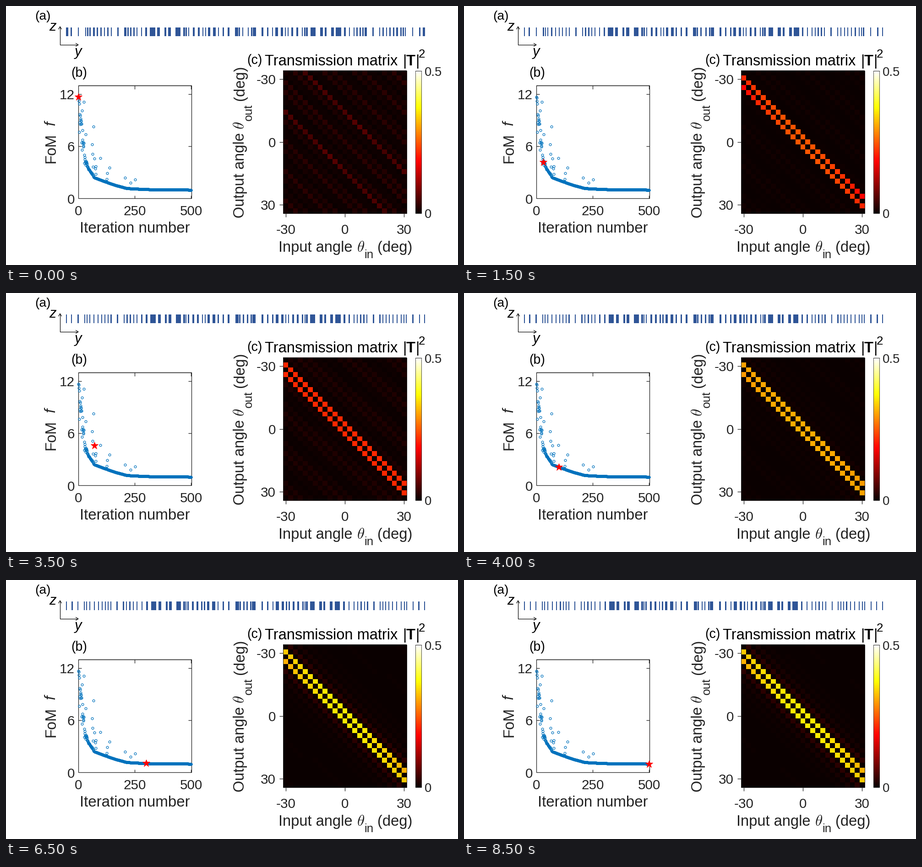
Write a matplotlib script that moves like this. It is 987 px wide and 567 px high and loops after 9 s.

```python
import numpy as np
import matplotlib.pyplot as plt
from matplotlib.animation import FuncAnimation
from matplotlib.collections import PolyCollection

W, H, DPI = 987, 567, 64
PT = 72 / DPI  # points per pixel
INK, BLUE, BAR = "#222222", "#0072BD", "#2F5597"
plt.rcParams["font.family"] = "Liberation Sans"

fig = plt.figure(figsize=(W / DPI, H / DPI), dpi=DPI, facecolor="white")
ax = fig.add_axes([0, 0, 1, 1])


def label(x, y, s, size=32.6, color=INK, **kw):
    ax.text(x, y, s, fontsize=size * PT, color=color, va="baseline",
            rotation_mode="anchor", **kw)


def line(xs, ys, width=1.3, color=INK):
    ax.plot(xs, ys, color=color, lw=width * PT, zorder=2,
            solid_capstyle="butt", solid_joinstyle="miter")


def box(x0, y0, x1, y1, width=1.3):
    line([x0, x1, x1, x0, x0, x1], [y0, y0, y1, y1, y0, y0], width)


def tick(x, y, s, ha="center", size=29.6):
    label(x, y + 0.355 * size, s, size, ha=ha)


# ---- (a) structure: an uneven comb, mirrored about the middle
MID, PITCH = 523, 9.87
comb = np.arange(40)
SHIFT = [(0, 0), (1, 0), (3, 12), (5, 1.7), (8, -3.5), (11, -10.6), (13, -1.3),
         (17, -13.8), (20, -14.4), (22, -2.1), (23, -4), (25, 9.2), (27, 0.5),
         (30, 1.9), (32, -5.8), (36, -2.3), (37, 3.8), (39, 0)]
start = 131 + PITCH * comb + np.interp(comb, *zip(*SHIFT))
drift = 3 * np.cos(2 * np.pi * (np.sqrt(comb + 0.3) - 1) / 1.8)


def bumps(*peaks):
    return sum(a * np.exp(-((comb - c) / 0.8) ** 2) for c, a in peaks)


lasting = 2.3 + bumps((20.2, 10), (22.6, 3), (24, 8), (28.5, 2.5), (32.6, 5.5),
                      (36.9, 5))
fading = bumps((0, 2.7), (6, 1.5), (13, 3))


def bar_shapes(it):
    move = np.interp(it, [1, 31, 71, 150, 350], [0, 0.12, 0.5, 0.65, 1])
    left = start + move * drift
    right = left + lasting + fading * np.exp(-(it - 1) / 10)
    spans = list(zip(left, right))
    spans += [(2 * MID - b, 2 * MID - a) for a, b in spans]
    return [[(a, 47), (b, 47), (b, 66), (a, 66)] for a, b in spans]


bars = PolyCollection(bar_shapes(1), facecolors=BAR, linewidths=0)
ax.add_collection(bars)

label(63, 30, "(a)", 28, "black")
label(94, 54, "z", 31, "black", style="italic")
label(150, 109, "y", 31, "black", style="italic")
line([118, 118, 157], [46, 85, 85], 1.2, "black")
line([114.5, 118, 121.5], [51, 45, 51], 1.2, "black")
line([152, 158, 152], [81.5, 85, 88.5], 1.2, "black")

# ---- (b) figure of merit against iteration
X0, Y0, X1, Y1 = 158, 420.7, 404.5, 173.7
its = np.arange(1, 501)
TREND = [(1, 11.7), (5, 9.8), (11, 9), (21, 6.3), (31, 4.15), (45, 3.4),
         (70, 2.4), (115, 1.95), (165, 1.5), (215, 1.15), (300, 1.03), (500, 0.97)]
SPIKES = [(24, 11.1), (32, 7.35), (60, 6.2), (63, 5.1), (67, 8.25), (71, 4.6),
          (139, 3.55), (207, 2.37), (232, 1.8), (252, 2.15)]
rng = np.random.default_rng(4)
fom = np.interp(its, *zip(*TREND))
# scatter that dies out and vanishes at every tenth step
calm = np.sin(np.pi * (its - 1) / 10) ** 2
fom += rng.normal(0, 1.5, 500) * calm * np.exp(-(its / 28) ** 2)
strays = rng.choice(np.arange(34, 135), 14, replace=False)
fom[strays - 1] += rng.exponential(0.8, 14) * calm[strays - 1]
for k, f in SPIKES:
    fom[k - 1] = f


def spot(it, f):
    return X0 + it * 0.4925, 421 - f * 19


box(X0, Y1, X1, Y0)
for x in (281, 404):
    line([x, x], [Y0, Y0 - 6])
    line([x, x], [Y1, Y1 + 8])
for y in (193, 307):
    line([X0, X0 + 7], [y, y])
    line([X1, X1 - 7], [y, y])
ax.plot(*spot(its, fom), "o", ms=4.9 * PT, mfc="none", mec=BLUE,
        mew=1.2 * PT, zorder=3)
star, = ax.plot([], [], "*", ms=17 * PT, color="red", mew=0.8 * PT, zorder=5)

label(142, 155, "(b)", 28.5, "black")
for x, s in ((158, "0"), (281, "250"), (404, "500")):
    tick(x, 447, s)
for y, s in ((193, "12"), (307, "6"), (422, "0")):
    tick(150, y, s, "right")
label(161, 496, "Iteration number", 33.1)
label(107, 344, "FoM", rotation=90)
label(107, 261, "f", rotation=90, style="italic")

# ---- (c) transmission matrix
row, col = np.mgrid[:29, :25]
order = row - col - 2
gap = np.abs(order)
odd = gap % 2
off = (col - 12) / 12
along = (row + col - 26) / 26


def matrix(it):
    f = fom[it - 1]
    peak = np.interp(f, [1, 1.7, 4.2, 4.6, 9, 11.7],
                     [0.36, 0.325, 0.245, 0.212, 0.105, 0.006])
    dip = np.interp(it, [1, 31, 71, 150], [0, 0.2, 0, 0.1])
    late = np.interp(it, [31, 300], [0, 1])

    if it == 1:  # light spread over many orders, strongest at the sixth
        ripple = 0.6 + 0.4 * np.cos(2 * np.pi * gap / 6 + 2 * along * np.sign(order))
        t = (0.005 + 0.019 * (1 - odd)) * ripple
        return t + 0.028 * (gap == 6) * (1 + 0.2 * np.cos(9 * along))

    wave = 0.6 + 0.4 * np.cos(0.75 * gap + 0.4 + 2 * along * np.sign(order))
    haze = np.interp(f, [1, 1.7, 4.2, 4.6, 9], [0.002, 0.004, 0.007, 0.017, 0.023])
    t = haze * (0.25 + 0.75 * odd) * wave
    t += 0.024 * late * odd * np.exp((3 - gap) / 2)
    main = peak * (1 - dip * off ** 2 * (1 - 0.25 * np.sign(order * off)))
    return np.choose(np.minimum(gap, 2), [0.1 * t, main, t])


view = dict(cmap="hot", vmin=0, vmax=0.5, interpolation="nearest", aspect="auto")
image = ax.imshow(matrix(1), extent=(605, 874.5, 454, 141.7), zorder=1, **view)
ax.imshow(np.linspace(0.5, 0, 256)[:, None], extent=(893.5, 907, 454, 142),
          zorder=1, **view)
box(605, 141.7, 874.5, 454, 1)
box(893.5, 142, 907, 454, 0.8)
for x, s in ((611, "-30"), (740, "0"), (869, "30")):
    line([x, x], [454, 462])
    tick(x, 488, s)
for y, s in ((160, "-30"), (298, "0"), (435, "30")):
    line([597, 605], [y, y])
    tick(589, y, s, "right")
for y, s in ((143, "0.5"), (454, "0")):
    tick(913.5, y, s, "left", 27.5)

label(526, 127, "(c)", 28.5, "black")
label(565, 130, "Transmission matrix", color="black")
label(866, 130, "|", color="black")
label(874, 130, "T", color="black", weight="bold")
label(894, 130, "|", color="black")
label(900.5, 113, "2", 26, "black")

label(595, 538, "Input angle")
label(766, 538, r"$\theta$", 33, math_fontfamily="cm")
label(782, 552, "in", 26)
label(811, 538, "(deg)")
label(520, 464, "Output angle", rotation=90)
label(520, 270, r"$\theta$", 33, rotation=90, math_fontfamily="cm")
label(537, 251, "out", 26, rotation=90)
label(520, 207, "(deg)", rotation=90)

ax.set_xlim(0, W)
ax.set_ylim(H, 0)
ax.axis("off")

STEPS = [*range(1, 72, 10), 100, 125, *range(150, 501, 50)]


def draw(n):
    it = STEPS[n]
    x, y = spot(it, fom[it - 1])
    star.set_data([x], [y])
    bars.set_verts(bar_shapes(it))
    image.set_data(matrix(it))
    return star, bars, image


anim = FuncAnimation(fig, draw, frames=len(STEPS), interval=500, repeat=True)
plt.show()
```
